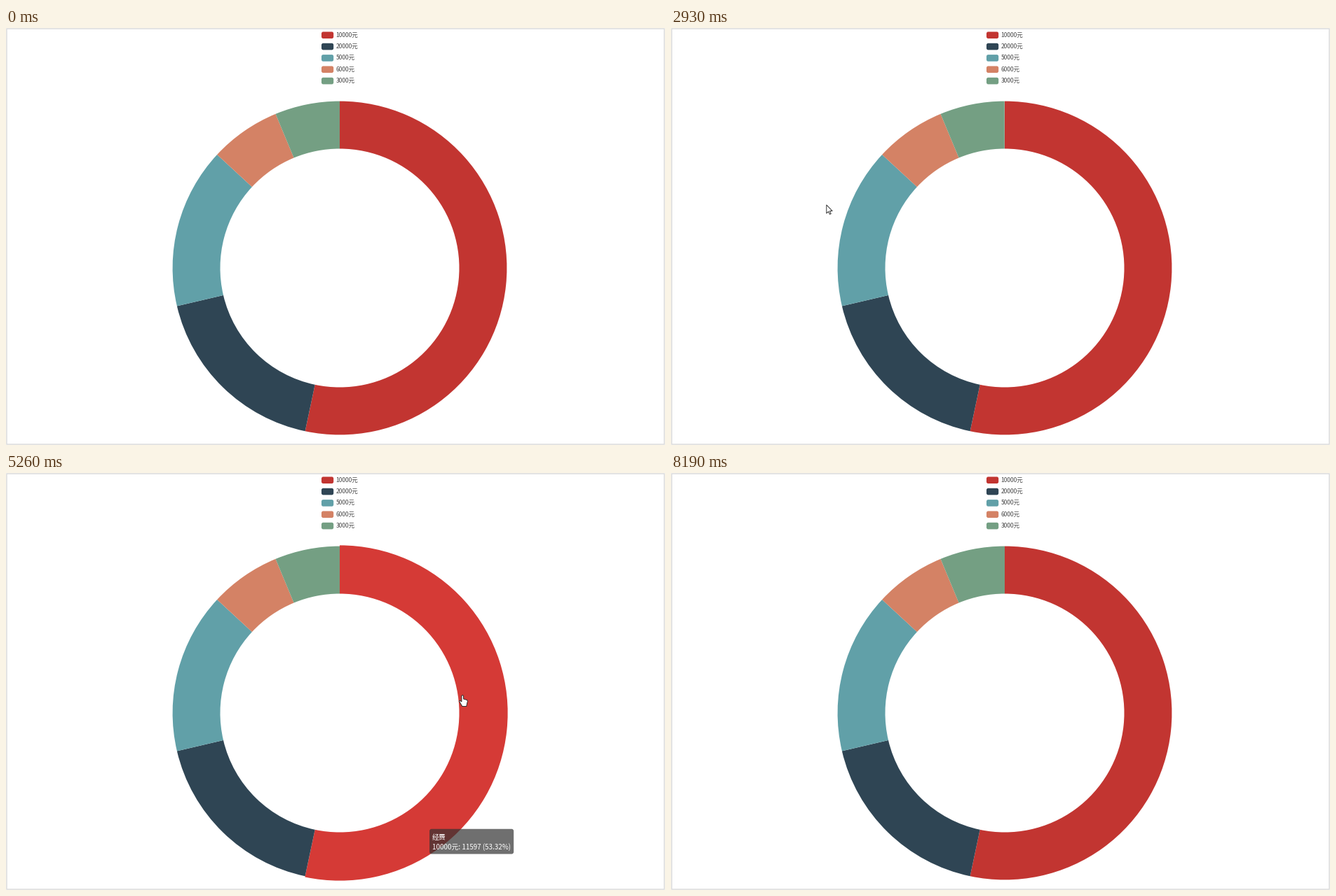
Write a matplotlib script that moves like this. It is 940x596 px and loops after 8420 ms.

```python
import numpy as np
import matplotlib.pyplot as plt
from matplotlib.animation import FuncAnimation
from matplotlib.colors import to_rgb
from matplotlib.patches import FancyBboxPatch, Polygon, Rectangle, Wedge

W, H, DPI = 940, 596, 100
LOOP, TICK = 8420, 20
MOVE_START, STEP = 1470, 77.2        # the picture advances in even steps
SWEEP_START, SWEEP_MS = 1914, 1000
HOVER_MS, HIDE_MS, TIP_LAG, TIP_GAP = 300, 100, 88, 14

CENTER, INNER, OUTER, LIFT = np.array([476, 343]), 170.5, 238.4, 7.2
COLORS = ["#c23531", "#2f4554", "#61a0a8", "#d48265", "#749f83"]
LABELS = [f"{n}元" for n in (10000, 20000, 5000, 6000, 3000)]
VALUES = np.array([11597, 3918, 3384, 1488, 1363])
SHARES = VALUES / VALUES.sum()
EDGES = np.append(0, SHARES.cumsum()) * 360
TIPS = [f"{n}: {v} ({s:.2%})" for n, v, s in zip(LABELS, VALUES, SHARES)]

# Pointer stops: time, x, y
STOPS = np.array([(2310, 146, 230), (3150, 262, 265), (3470, 262, 265),
                  (3554, 294, 352.5), (3900, 339, 475.6), (4330, 339, 475.6),
                  (4385, 440, 520), (4481, 520, 517.5), (5170, 588, 520),
                  (5253, 652, 315), (5430, 575, 160), (5600, 400.5, 134),
                  (6400, 400.5, 134), (6800, 376, 177), (7640, 376, 177),
                  (8110, 115, 580)])

HAND = np.array([(-1.3, 1), (0, 0), (1.3, 1), (1.4, 5.5), (6.4, 7), (7.2, 8.5),
                 (5.5, 16), (-.5, 16), (-4.8, 8.6), (-3.8, 7.7), (-1.3, 9.4)])
ARROW = np.array([(0, 0), (0, 12), (2.8, 9.5), (4.6, 13.4), (6.4, 12.6),
                  (4.6, 8.8), (8.3, 8.6)])


def pointer_at(t):
    return np.array([np.interp(t, STOPS[:, 0], STOPS[:, c]) for c in (1, 2)])


def sector_at(point):
    """Index of the ring sector under a point, or -1."""
    dx, dy = point - CENTER
    if not INNER <= np.hypot(dx, dy) <= OUTER:
        return -1
    angle = np.degrees(np.arctan2(dx, -dy)) % 360
    return int(np.searchsorted(EDGES[1:-1], angle, "right"))


def elastic_out(u):
    if u <= 0 or u >= 1:
        return float(u >= 1)
    return 1 + 2 ** (-10 * u) * np.sin((u - .1) * 2 * np.pi / .4)


def simulate(dt=1):
    """Hover state and lagging tooltip for every millisecond of the loop."""
    active = last = -1
    since, left, tip = 0, -HIDE_MS, np.zeros(2)
    previous, states = -1, []
    for t in range(0, LOOP, dt):
        inside = STOPS[0, 0] <= t < STOPS[-1, 0]
        point = pointer_at(t)
        hit = sector_at(point) if inside else -1
        if hit != active:
            previous, active, since = active, hit, t
        shown = t - left < HIDE_MS
        if hit >= 0:
            goal = point + TIP_GAP
            tip = goal + (tip - goal) * np.exp(-dt / TIP_LAG) if shown else goal
            last, left, shown = hit, t, True
        states.append(dict(t=t, inside=inside, point=point, active=active,
                           previous=previous, grow=elastic_out((t - since) / HOVER_MS),
                           tip=tip, label=TIPS[last], shown=shown))
    return states


def px(size):
    return size * 72 / DPI


plt.rcParams["font.family"] = "Noto Sans CJK JP"
fig = plt.figure(figsize=(W / DPI, H / DPI), dpi=DPI, facecolor="white")
ax = fig.add_axes([0, 0, 1, 1])
ax.set(xlim=(0, W), ylim=(H, 0))
ax.axis("off")
ax.add_patch(Rectangle((.75, .75), W - 1.5, H - 1.5, fill=False, ec="#dcdcdc", lw=px(1.5)))


def rounded(x, y, w, h, r, **style):
    box = FancyBboxPatch((x, y), w, h, boxstyle=f"round,pad=0,rounding_size={r}",
                         lw=0, **style)
    return ax.add_patch(box)


for i, (color, label) in enumerate(zip(COLORS, LABELS)):
    y = 10.2 + 16.35 * i
    rounded(450, y - 4.8, 17.2, 9.6, 2.5, fc=color)
    ax.text(470.5, y + 2.4, label, size=px(8.5), color="#4a4a4a", va="baseline")

sectors = [ax.add_patch(Wedge(CENTER, OUTER, a - 90, b - 90, width=OUTER - INNER,
                              fc=c, lw=0))
           for a, b, c in zip(EDGES, EDGES[1:], COLORS)]
tip_box = rounded(0, 0, 100, 35.8, 3, fc=(.196, .196, .196, .7), zorder=5)
tip_text = [ax.text(0, 0, "经费", size=px(9.85), color="white", va="baseline", zorder=6)
            for _ in range(2)]
cursor = ax.add_patch(Polygon(HAND, fc="white", ec="#222222", lw=px(.9),
                              joinstyle="round", zorder=8))
states = simulate()


def draw_ring(s):
    u = np.clip((s["t"] - SWEEP_START) / SWEEP_MS, 0, 1)
    sweep = 360 * (1 - (1 - u) ** 3) if s["t"] >= SWEEP_START else 360
    for i, wedge in enumerate(sectors):
        on = i == s["active"]
        lift = s["grow"] if on else 1 - s["grow"] if i == s["previous"] else 0
        radius = OUTER + LIFT * lift
        wedge.set_radius(radius)
        wedge.set_width(radius - INNER)
        wedge.set_theta2(min(EDGES[i + 1], sweep) - 90)
        wedge.set_visible(sweep > EDGES[i])
        wedge.set_facecolor(np.array(to_rgb(COLORS[i])) * (1.1 if on else 1))


def draw_tip(s):
    x, y = s["tip"]
    tip_box.set_bounds(x, y, 103 + 5.7 * (len(s["label"]) - 19), 35.8)
    tip_text[1].set_text(s["label"])
    for line, dy in zip(tip_text, (15.2, 29.2)):
        line.set_position((x + 3.6, y + dy))
    for part in (tip_box, *tip_text):
        part.set_visible(s["shown"])


def draw_cursor(s):
    cursor.set_visible(s["inside"])
    cursor.set_xy((HAND if s["active"] >= 0 else ARROW) + s["point"])


def update(n):
    now = n * TICK + TICK / 2
    steps = (now - MOVE_START) // STEP
    s = states[int(MOVE_START + steps * STEP) if steps >= 0 else 0]
    draw_ring(s)
    draw_tip(s)
    draw_cursor(s)
    return [*sectors, tip_box, *tip_text, cursor]


anim = FuncAnimation(fig, update, frames=LOOP // TICK, interval=TICK, repeat=True,
                     repeat_delay=0)
plt.show()
```
